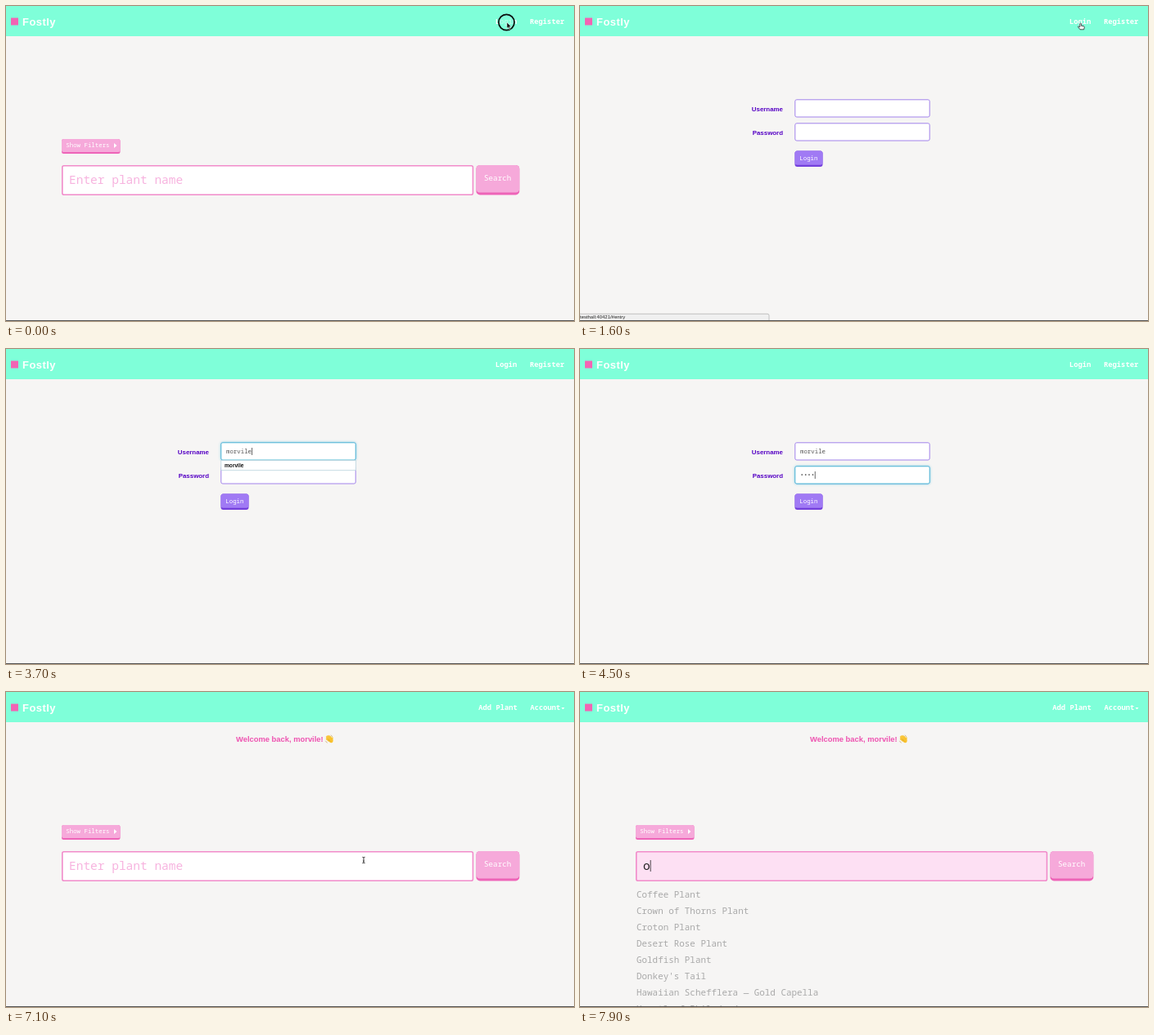
These frames come from a looping animation (694 px wide and 386 px high, 8000 ms). An HTML page:

```html
<!DOCTYPE html>
<html lang="en">
<head>
<meta charset="utf-8">
<title>Plant search</title>
<style>
  html, body { margin: 0; width: 100%; height: 100%; overflow: hidden; background: #f6f5f4; }
  svg { display: block; width: 100vw; height: 100vh; }
  text { font-family: "Liberation Sans", Arial, sans-serif; white-space: pre; }
  .mono text, text.mono { font-family: "Noto Sans Mono", "DejaVu Sans Mono", monospace; }
  .nav text { font-size: 8.8px; font-weight: 600; fill: #fff; }
  .label { font-size: 7.9px; font-weight: 700; fill: #5500c4; text-anchor: end; }
  .entry { font-size: 7.4px; fill: #555; }
  .box { fill: #fff; stroke: #a182ea; }
  .glow { fill: #fff; stroke: #55bcd6; filter: drop-shadow(0 0 1.5px #7fd0e4); }
  .list text { font-size: 10.9px; fill: #a9a9a9; }

  /* Every part shares one 8 s clock; 1.25% is 100 ms. */
  .a { animation: 8s step-end infinite; }
  .home { animation-name: home; }
  .login { animation-name: login; }
  .guest { animation-name: guest; }
  .member { animation-name: member; }
  .ring { animation-name: ring; }
  .status { animation-name: status; }
  .user-on { animation-name: user-on; }
  .pass-on { animation-name: pass-on; }
  .hint { animation-name: hint; }
  .type-user { animation-name: type-user; }
  .type-pass { animation-name: type-pass; }
  .tint { animation-name: tint; }
  .empty { animation-name: empty; }
  .query { animation-name: query; }
  .list { animation-name: list; }
  .caret { animation-name: caret; }
  .pointer { animation-name: pointer; }
  .arrow { animation-name: arrow; }
  .hand { animation-name: hand; }
  .beam { animation-name: beam; }

  @keyframes home { 0% { opacity: 1 } 20% { opacity: 0 } 66.25%, 100% { opacity: 1 } }
  @keyframes login { 0% { opacity: 0 } 20% { opacity: 1 } 66.25%, 100% { opacity: 0 } }
  @keyframes guest { 0% { opacity: 1 } 66.25%, 100% { opacity: 0 } }
  @keyframes member { 0% { opacity: 0 } 66.25%, 100% { opacity: 1 } }
  @keyframes ring { 0% { opacity: 1 } 3.75%, 100% { opacity: 0 } }
  @keyframes status {
    0% { opacity: 0 } 12.5% { opacity: .2 } 13.75% { opacity: .4 } 15% { opacity: .6 }
    16.25% { opacity: .8 } 17.5% { opacity: 1 } 26.25% { opacity: .7 }
    27.5% { opacity: .4 } 28.75% { opacity: .15 } 30%, 100% { opacity: 0 }
  }
  @keyframes user-on { 0% { opacity: 0 } 35% { opacity: 1 } 50%, 100% { opacity: 0 } }
  @keyframes pass-on { 0% { opacity: 0 } 50%, 100% { opacity: 1 } }
  @keyframes hint { 0% { opacity: 0 } 37.5% { opacity: 1 } 50%, 100% { opacity: 0 } }
  @keyframes type-user {
    0% { transform: none }
    37.5% { transform: translateX(4.44px) }
    38.75% { transform: translateX(8.88px) }
    41.25% { transform: translateX(13.32px) }
    43.75% { transform: translateX(22.2px) }
    45% { transform: translateX(26.64px) }
    46.25%, 100% { transform: translateX(31.08px) }
  }
  @keyframes type-pass {
    0% { transform: none }
    51.25% { transform: translateX(4.44px) }
    53.75% { transform: translateX(8.88px) }
    55% { transform: translateX(13.32px) }
    56.25% { transform: translateX(17.76px) }
    60% { transform: translateX(22.2px) }
    61.25%, 100% { transform: translateX(26.64px) }
  }
  @keyframes tint { 0% { opacity: 0 } 90% { opacity: .5 } 91.25%, 100% { opacity: 1 } }
  @keyframes empty { 0% { opacity: 1 } 96.25%, 100% { opacity: 0 } }
  @keyframes query { 0% { opacity: 0 } 96.25%, 100% { opacity: 1 } }
  @keyframes list { 0% { opacity: 0 } 96.25% { opacity: .6 } 97.5%, 100% { opacity: 1 } }
  @keyframes caret {
    0% { opacity: 0; transform: none }
    91.25% { opacity: 1; transform: none }
    96.25%, 100% { opacity: 1; transform: translateX(8.7px) }
  }
  @keyframes pointer {
    0% { transform: translate(612px, 20px) }
    23.75% { transform: translate(612px, 20px); animation-timing-function: steps(8) }
    33.75% { transform: translate(380px, 126px) }
    73.75% { transform: translate(382px, 146px); animation-timing-function: steps(3) }
    77.5% { transform: translate(472px, 110px) }
    83.75% { transform: translate(472px, 110px); animation-timing-function: steps(4) }
    88.75%, 100% { transform: translate(437px, 206px) }
  }
  @keyframes arrow {
    0% { opacity: 1 } 1.25% { opacity: 0 } 25% { opacity: 1 } 33.75% { opacity: 0 }
    73.75% { opacity: 1 } 88.75%, 100% { opacity: 0 }
  }
  @keyframes hand { 0% { opacity: 0 } 1.25% { opacity: 1 } 25%, 100% { opacity: 0 } }
  @keyframes beam {
    0% { opacity: 0 } 33.75% { opacity: 1 } 37.5% { opacity: 0 }
    88.75% { opacity: 1 } 96.25%, 100% { opacity: 0 }
  }
</style>
</head>
<body>
<svg viewBox="0 0 694 386" preserveAspectRatio="none">
  <rect width="694" height="386" fill="#f6f5f4"/>

  <!-- Header -->
  <rect width="694" height="37" fill="#7fffd9"/>
  <rect x="6" y="14.5" width="9" height="9" fill="#f264b4"/>
  <text x="20" y="23.5" font-size="13" font-weight="700" letter-spacing=".45" fill="#fff">Fostly</text>
  <g class="a guest mono nav">
    <text x="598" y="22.4">Login</text>
    <text x="640" y="22.4">Register</text>
  </g>
  <g class="a member mono nav">
    <text x="577.3" y="22.4">Add Plant</text>
    <text x="640.4" y="22.4">Account</text>
    <path d="M678.5 19h4l-2 2.2z" fill="#fff"/>
  </g>

  <!-- Search page -->
  <g class="a home">
    <rect x="68" y="163" width="71.5" height="18" rx="2.5" fill="#ee64b8"/>
    <rect x="68" y="163" width="71.5" height="16" rx="2.5" fill="#f6a9da"/>
    <text class="mono" x="73.3" y="173.2" font-size="7.4" fill="#fff">Show Filters</text>
    <path d="M132 168l3.4 3-3.4 3z" fill="#fff"/>

    <rect x="68.8" y="195.8" width="501.7" height="35.4" rx="2" fill="#fff"/>
    <rect class="a tint" x="68.8" y="195.8" width="501.7" height="35.4" rx="2" fill="#fde0f3"/>
    <rect x="68.8" y="195.8" width="501.7" height="35.4" rx="2" fill="none" stroke="#f18bca" stroke-width="1.6"/>
    <text class="a empty mono" x="77" y="217.8" font-size="14.5" fill="#f7b3df">Enter plant name</text>
    <text class="a query mono" x="77" y="217.8" font-size="14.5" fill="#222">o</text>
    <rect class="a caret" x="77" y="206" width=".8" height="14" fill="#222"/>

    <rect x="574.5" y="195" width="52.8" height="36.4" rx="4.5" fill="#ee64b8"/>
    <rect x="574.5" y="195" width="52.8" height="33.6" rx="4.5" fill="#f6a9da"/>
    <text class="mono" x="584" y="214.4" font-size="9.25" fill="#fff">Search</text>

    <g class="a member">
      <text x="281" y="61.2" font-size="9.4" font-weight="700" fill="#ee52b0">Welcome back, morvile!</text>
      <g transform="translate(390 52)" stroke-linecap="round" fill="none">
        <path d="M3.2 5.6L1.6 3M4.8 5L2.8 1.9M6.4 4.6L4.6 1.6M7.6 5.4L6.6 2.8M4.2 8L1.5 5.5M8.6 6.6L8.9 4" stroke="#f9c22e" stroke-width="1.5"/>
        <path d="M2.8 5.4L7.4 4.4 9.6 6.8Q10 10.4 7.2 10.2 5 10 2.8 5.4z" fill="#f9c22e"/>
        <path d="M3.6 5.8L5.8 8.2M7 1q1.4.4 1.7 1.6M.6 8.2q.4 1.6 1.8 2" stroke="#b98a2c" stroke-width=".5"/>
      </g>
    </g>
    <g class="a list mono">
      <text x="69" y="252.3">Coffee Plant</text>
      <text x="69" y="272.2">Crown of Thorns Plant</text>
      <text x="69" y="292.1">Croton Plant</text>
      <text x="69" y="312">Desert Rose Plant</text>
      <text x="69" y="331.9">Goldfish Plant</text>
      <text x="69" y="351.8">Donkey's Tail</text>
      <text x="69" y="371.7">Hawaiian Schefflera — Gold Capella</text>
      <text x="69" y="391.6">Heartleaf Philodendron</text>
    </g>
  </g>

  <!-- Login page -->
  <g class="a login">
    <text class="label" x="248" y="128.7">Username</text>
    <text class="label" x="248" y="157.7">Password</text>
    <rect class="box" x="262.8" y="114.8" width="164.4" height="21.2" rx="2"/>
    <rect class="box" x="262.8" y="143.8" width="164.4" height="21.2" rx="2"/>
    <rect class="a user-on glow" x="262.8" y="114.8" width="164.4" height="21.2" rx="2"/>
    <rect class="a pass-on glow" x="262.8" y="143.8" width="164.4" height="21.2" rx="2"/>

    <!-- A white cover slides off the text as it is typed -->
    <text class="mono entry" x="269" y="128.2">morvile</text>
    <g class="a type-user">
      <rect x="269" y="119" width="60" height="13" fill="#fff"/>
      <rect class="a user-on" x="269" y="121" width=".8" height="9" fill="#444"/>
    </g>
    <text class="mono entry" x="269" y="157.2">••••••</text>
    <g class="a type-pass">
      <rect x="269" y="148" width="60" height="13" fill="#fff"/>
      <rect class="a pass-on" x="269" y="150" width=".8" height="9" fill="#444"/>
    </g>

    <g class="a hint">
      <rect x="262.8" y="136.5" width="164.8" height="12.2" fill="#fff" stroke="#b9d3dc" stroke-width=".8"/>
      <text x="267" y="145.4" font-size="6.6" font-weight="700" fill="#111">morvile</text>
    </g>

    <rect x="262.5" y="177.5" width="34" height="19.5" rx="3" fill="#7440dc"/>
    <rect x="262.5" y="177.5" width="34" height="17.3" rx="3" fill="#a07af4"/>
    <text class="mono" x="268.3" y="189" font-size="7.4" fill="#fff">Login</text>
  </g>

  <!-- Browser status and window edge -->
  <g class="a status">
    <rect x="-2" y="377.3" width="233" height="12" rx="2" fill="#f0f0f0" stroke="#b4b4b4" stroke-width=".8"/>
    <text x="0" y="383.2" font-size="5.95" fill="#222">testhall:40421/#entry</text>
  </g>
  <rect y="385" width="694" height="1" fill="#555"/>

  <!-- Pointer -->
  <circle class="a ring" cx="611.5" cy="20" r="9.6" fill="#7fffd9" fill-opacity=".6" stroke="#0a0a0a" stroke-width="1.7"/>
  <g class="a pointer">
    <path class="a arrow" d="M0 0v7.4l1.7-1.5 1.2 2.8 1.3-.6-1.2-2.7h2.3z" fill="#111" stroke="#fff" stroke-width=".5"/>
    <path class="a hand" d="M-1.2 1.6q.8-1 1.6 0v2.6l3 .5q1 .3.8 1.6l-.5 2.5H-1L-3.6 5.4q.4-1.2 2.4.4z" fill="#fff" stroke="#222" stroke-width=".8"/>
    <path class="a beam" d="M-1.6-3.7Q0-3.7 0-2.8 0-3.7 1.6-3.7M0-2.8V2.8M-1.6 3.7Q0 3.7 0 2.8 0 3.7 1.6 3.7M-.9 1.2H.9" fill="none" stroke="#222" stroke-width=".9"/>
  </g>
</svg>
</body>
</html>
```
